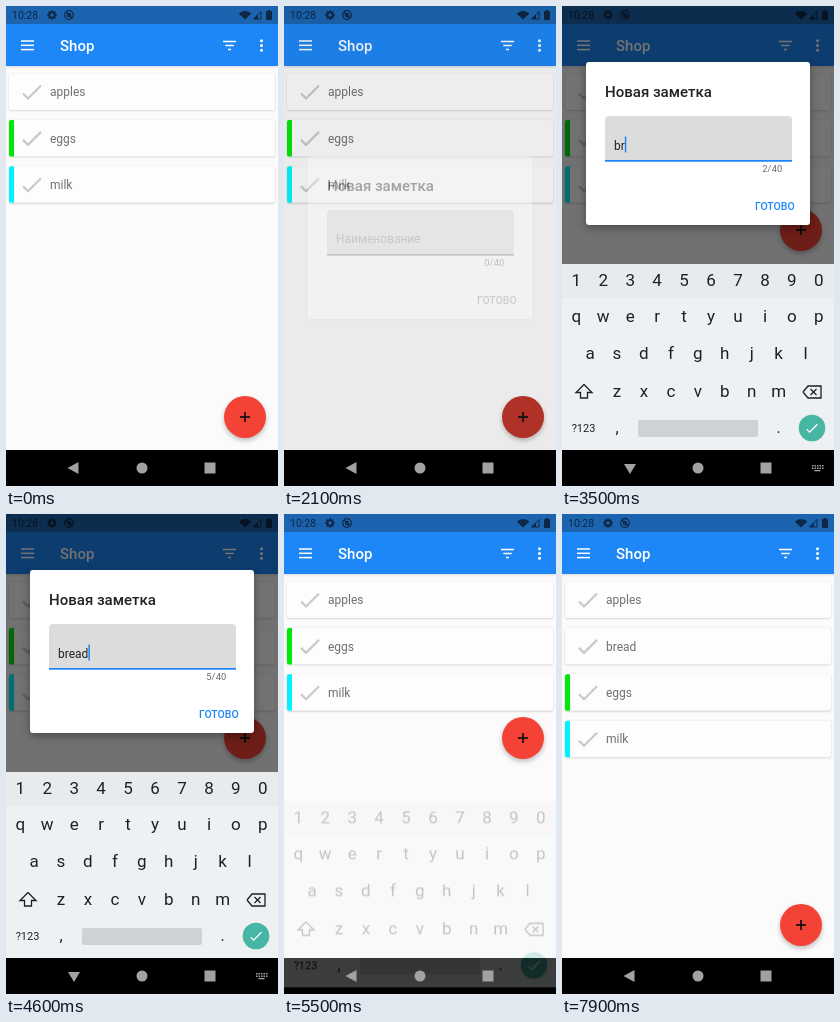
An HTML page with a canvas for the animation above (8000 ms loop, 272 by 480 pixels).

```html
<!DOCTYPE html>
<html lang="ru">
<head>
<meta charset="utf-8">
<title>Shopping list</title>
<style>
html, body { margin: 0; width: 100%; height: 100%; overflow: hidden; background: #fafafa; }
canvas { display: block; width: 272px; height: 480px; }
</style>
</head>
<body>
<canvas id="stage"></canvas>
<script>
const W = 272, H = 480, LOOP = 8000, NAV_TOP = 444;
const BLUE = '#1e87f7', RED = '#f44336', INK = '#0e2745', PAGE = '#fbfbfc';
const dpr = window.devicePixelRatio || 1;

function context(canvas) {
  canvas.width = W * dpr;
  canvas.height = H * dpr;
  const ctx = canvas.getContext('2d');
  ctx.scale(dpr, dpr);
  return ctx;
}
const buffer = context(document.createElement('canvas'));
let g = context(document.getElementById('stage'));

const ramp = (t, from, to) => Math.min(1, Math.max(0, (t - from) / (to - from)));
const ease = (t, from, to) => { const p = ramp(t, from, to); return p * p * (3 - 2 * p); };

// Draws a group off screen, then blends it as one picture.
function layer(alpha, dy, draw) {
  if (alpha <= 0) return;
  const stage = g;
  g = buffer;
  g.clearRect(0, 0, W, H);
  draw();
  g = stage;
  g.globalAlpha = alpha;
  g.drawImage(buffer.canvas, 0, dy, W, H);
  g.globalAlpha = 1;
}
function shadowed(blur, dy, alpha, draw) {
  g.save();
  g.shadowColor = `rgba(0,0,0,${alpha})`;
  g.shadowBlur = blur * dpr;
  g.shadowOffsetY = dy * dpr;
  draw();
  g.restore();
}
function rect(x, y, w, h, color, radius = 0) {
  g.fillStyle = color;
  g.beginPath();
  g.roundRect(x, y, w, h, radius);
  g.fill();
}
function circle(x, y, r, color) {
  g.fillStyle = color;
  g.beginPath();
  g.arc(x, y, r, 0, 7);
  g.fill();
}
function ring(x, y, r, color, width) {
  g.strokeStyle = color;
  g.lineWidth = width;
  g.beginPath();
  g.arc(x, y, r, 0, 7);
  g.stroke();
}
function path(points) {
  g.beginPath();
  points.forEach(([x, y]) => g.lineTo(x, y));
}
function poly(color, ...points) {
  g.fillStyle = color;
  path(points);
  g.fill();
}
function line(color, width, ...points) {
  g.strokeStyle = color;
  g.lineWidth = width;
  path(points);
  g.stroke();
}
function text(s, x, y, size, color, { weight = 400, align = 'left', spacing = 0 } = {}) {
  g.font = `${weight} ${size}px Roboto, sans-serif`;
  g.textAlign = align;
  g.letterSpacing = spacing + 'px';
  g.fillStyle = color;
  g.fillText(s, x, y);
  return g.measureText(s).width;
}

function statusBar() {
  rect(0, 0, W, 18, '#1c64b0');
  text('10:28', 6, 13, 10.5, INK);
  ring(46, 9, 2.8, INK, 2);
  for (let i = 0; i < 8; i++) {
    const a = i * Math.PI / 4;
    circle(46 + 4 * Math.cos(a), 9 + 4 * Math.sin(a), 0.9, INK);
  }
  ring(63, 9, 4.3, INK, 1.2);
  ring(63, 9, 1.6, INK, 1.2);
  line(INK, 1.2, [60, 6], [66, 12]);
  g.fillStyle = INK;
  g.beginPath();
  g.moveTo(239, 13.5);
  g.arc(239, 13.5, 8.5, -Math.PI * 0.76, -Math.PI * 0.24);
  g.fill();
  line(INK, 1, [247.5, 13], [255, 13], [255, 5.5], [247.5, 13]);
  poly(INK, [248, 13], [252, 13], [252, 8.5]);
  rect(260, 5, 6, 9, INK, 1);
  rect(262, 4, 2, 1, INK);
}

function appBar(title) {
  shadowed(3, 0.5, 0.2, () => rect(0, 18, W, 42, BLUE));
  statusBar();
  text(title, 54, 45, 15, '#fff', { weight: 500 });
}

function check(x, y, color, s = 1) {
  line(color, 2.2 * s, [x - 9 * s, y + s], [x - 4 * s, y + 6 * s], [x + 9 * s, y - 7 * s]);
}

function card(label, row, color) {
  const y = 67.5 + row * 46.4;
  shadowed(2, 0.6, 0.22, () => rect(3, y, 266, 36.5, '#fdfdfd', 2));
  if (color) rect(3, y, 5, 36.5, color, [2, 0, 0, 2]);
  check(26, y + 19, '#c9c9c9');
  text(label, 44, y + 22.7, 12, '#707070');
}

function fab(y, press) {
  shadowed(5, 2.5, 0.25, () => circle(239, y, 21, RED));
  circle(239, y, 21, `rgba(0,0,0,${0.23 * press})`);
  line('#111', 1.7, [234, y], [244, y]);
  line('#111', 1.7, [239, y - 5], [239, y + 5]);
}

function listScreen(t) {
  rect(0, 0, W, H, PAGE);
  const shift = ease(t, 7250, 7500);
  card('apples', 0);
  layer(ramp(t, 7480, 7650), 0, () => card('bread', 1));
  card('eggs', 1 + shift, '#00e808');
  card('milk', 2 + shift, '#00f4ff');
  appBar('Shop');
  for (const y of [35, 39.3, 43.6]) line('#fff', 1.5, [15, y], [28, y]);
  line('#fff', 1.5, [217, 35.5], [230, 35.5]);
  line('#fff', 1.5, [219.3, 39.5], [227.7, 39.5]);
  line('#fff', 1.5, [222, 43.5], [225, 43.5]);
  for (const y of [34.7, 39.5, 44.3]) circle(255.5, y, 1.5, '#fff');
  const raised = t >= 2600 && t < 5600;
  fab(raised ? 224 : 411, ramp(t, 1900, 2000) - ramp(t, 2250, 2450));
}

function cursor(x, y, h) {
  rect(x, y, 1.5, h, BLUE);
}

function dialog(typed, shadow) {
  shadowed(9, 3, shadow, () => rect(24, 56, 224, 163, '#fff', 3));
  text('Новая заметка', 43, 91, 15, '#222', { weight: 500 });
  rect(43, 110, 187, 45, '#dcdcdc', [4, 4, 0, 0]);
  rect(43, 154, 187, 1.8, typed ? BLUE : '#8a8a8a');
  if (typed) cursor(52 + text(typed, 52, 143.7, 12, '#222'), 130.5, 16);
  else text('Наименование', 52, 143, 12, '#8a8a8a');
  text(`${typed.length}/40`, 220.5, 166, 9.3, '#6a6a6a', { align: 'right', spacing: 0.2 });
  text('ГОТОВО', 193, 203.7, 10.5, typed ? BLUE : '#999', { weight: 500 });
}

function keyboard() {
  const ink = '#1d2124';
  rect(0, 258, W, 186, '#eef1f3');
  rect(0, 258, W, 34, '#e8ebee');
  const rows = [['1234567890', 14.3, 274], ['qwertyuiop', 14.3, 309.5], ['asdfghjkl', 28, 347], ['zxcvbnm', 55, 385]];
  for (const [keys, x, y] of rows)
    [...keys].forEach((key, i) => text(key, x + i * 26.95, y + 6, 17, ink, { align: 'center' }));
  line(ink, 1.3, [22, 378.5], [14, 386.5], [18.5, 386.5], [18.5, 392], [25.5, 392], [25.5, 386.5], [30, 386.5], [22, 378.5]);
  line(ink, 1.3, [241, 386], [246, 380], [259, 380], [259, 392], [246, 392], [241, 386]);
  line(ink, 1.3, [248.5, 383], [254.5, 389]);
  line(ink, 1.3, [254.5, 383], [248.5, 389]);
  text('?123', 21.5, 426, 11, ink, { align: 'center' });
  text(',', 55, 427, 16, ink, { align: 'center' });
  text('.', 216.5, 427, 16, ink, { align: 'center' });
  rect(76, 414, 120, 17, '#cfd2d5', 2);
  circle(250, 422, 13.3, '#48b6a4');
  check(250, 422.5, '#fff', 0.6);
}

function navBar(keysOpen) {
  const gray = '#a2a2a2';
  if (keysOpen) {
    poly(gray, [62, 458], [74, 458], [68, 468]);
    for (const y of [459, 461.5]) for (let x = 250; x < 261; x += 2.5) rect(x, y, 1.5, 1.5, gray);
    rect(252.5, 464, 6, 1.3, gray);
  } else {
    poly(gray, [61.5, 462], [72.5, 456], [72.5, 468]);
  }
  circle(136, 462, 5.5, gray);
  rect(198.5, 456.5, 11, 11, gray);
}

function editScreen(press) {
  rect(0, 0, W, H, PAGE);
  appBar('Tidy Scribbling');
  line('#fff', 1.6, [27.5, 39.3], [16, 39.3]);
  line('#fff', 1.6, [21.5, 33.5], [15.8, 39.3], [21.5, 45.1]);
  rect(249, 33.3, 10, 1.6, '#fff');
  rect(252, 32.3, 4, 1.5, '#fff');
  rect(249.7, 36, 8.6, 10, '#fff', [0, 0, 1.5, 1.5]);

  g.strokeStyle = BLUE;
  g.lineWidth = 1.8;
  g.beginPath();
  g.roundRect(12.8, 77, 246.4, 39, 3);
  g.stroke();
  rect(18, 74, 71, 6, PAGE);
  text('Наименование', 21, 80, 9, BLUE);
  cursor(21 + text('bread', 21, 101, 12, '#222'), 89, 15);

  text('Цвет', 12, 144.5, 11, '#222');
  circle(60.5, 140, 12, '#fff');
  ring(60.5, 140, 12, '#777', 0.9);
  text('Выполнено', 12, 186.5, 11, '#222');
  rect(88, 178.5, 19.5, 8.5, '#a5a5a5', 4.2);
  shadowed(2, 0.8, 0.35, () => circle(91.5, 182.8, 6, '#fbfbfb'));
  shadowed(3, 1, 0.35, () => rect(88, 217, 96, 27, RED, 3));
  rect(88, 217, 96, 27, `rgba(255,255,255,${0.2 * press})`, 3);
  text('СОХРАНИТЬ', 136.5, 234.5, 10.5, '#fff', { weight: 500, align: 'center', spacing: 0.9 });
}

const keyTimes = [3000, 3400, 3700, 4000, 4250];

function render(t) {
  listScreen(t);

  const closing = ramp(t, 5100, 5300);
  rect(0, 0, W, H, `rgba(0,0,0,${0.55 * (ease(t, 2020, 2400) - closing)})`);
  const typed = 'bread'.slice(0, keyTimes.filter(k => t >= k).length);
  const shown = ramp(t, 2000, 2280) - closing;
  layer(shown, 94 * (1 - ease(t, 2450, 2700)), () => dialog(typed, 0.35 * shown ** 2));

  const edit = ease(t, 5600, 5850) - ease(t, 6900, 7150);
  layer(edit, 36 * (1 - edit), () => editScreen(ramp(t, 6600, 6700) - ramp(t, 6800, 6900)));

  rect(0, NAV_TOP, W, H - NAV_TOP, '#000');
  const keys = ramp(t, 2450, 2700) - ramp(t, 5300, 5567);
  layer(keys, 39 * (1 - keys), keyboard);
  navBar(t >= 2500 && t < 5300);
}

function tick() {
  render(performance.now() % LOOP);
  requestAnimationFrame(tick);
}
tick();
</script>
</body>
</html>
```
